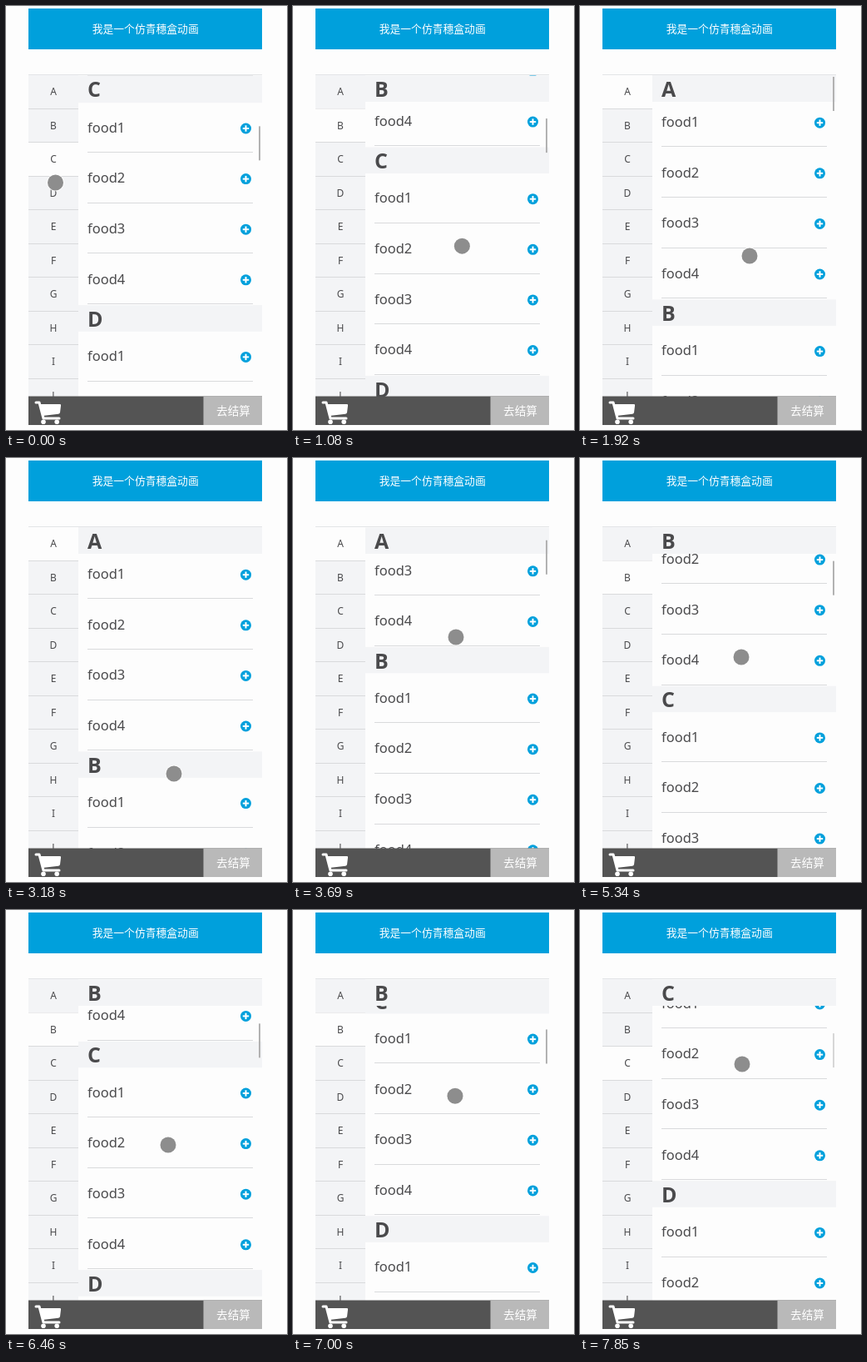
Write an HTML page with a canvas that moves like this. It is 338 by 509 pixels and loops after 8000 ms.

```html
<!DOCTYPE html>
<html lang="zh">
<head>
<meta charset="utf-8">
<style>
  html, body { margin: 0; width: 100%; height: 100%; overflow: hidden; background: #fdfdfd; }
  canvas { display: block; width: 338px; height: 509px; }
</style>
</head>
<body>
<canvas id="stage"></canvas>
<script>
const LOOP = 8000, STEP = 138;
const W = 338, H = 509;
const ROW = 60.6, HEADING = 32, SECTION = 4 * ROW + HEADING, TAB = 40.5;
const LATIN = '"Noto Sans", "Open Sans", sans-serif';
const CJK = '"Noto Sans CJK SC", "Noto Sans CJK", sans-serif';
const PAPER = '#fdfdfd', BLUE = '#00a0dc', PANEL = '#f3f4f6', INK = '#4a4a4c', RULE = '#d9dadc';

// Each glide eases the list to a new offset between two steps.
const GLIDES = [
  { start: -3, end: -2, to: 542 },
  { start: 6, end: 14, to: 0 },
  { start: 23, end: 30, to: 207 },
  { start: 32, end: 45, to: 469 },
  { start: 47, end: 54, to: 576 }
];

// Pointer stops: it eases from one to the next.
const STOPS = [
  { at: 0, x: 59.5, y: 212 },
  { at: 5, x: 200, y: 224 },
  { at: 9, x: 204, y: 300 },
  { at: 14, x: 204, y: 300 },
  { at: 18, x: 37, y: 110 },
  { at: 23, x: 202, y: 379 },
  { at: 27, x: 196, y: 215 },
  { at: 32, x: 195, y: 401 },
  { at: 39, x: 194, y: 239 },
  { at: 47, x: 195, y: 282 },
  { at: 54, x: 195, y: 185 }
];

const canvas = document.getElementById('stage');
const ctx = canvas.getContext('2d');
const ratio = window.devicePixelRatio || 1;
canvas.width = W * ratio;
canvas.height = H * ratio;
ctx.scale(ratio, ratio);

const clamp = v => Math.min(1, Math.max(0, v));
const mix = (a, b, p) => a + (b - a) * p;
const letter = i => String.fromCharCode(65 + i);

function ease(step, start, end) {
  const p = clamp((step - start) / (end - start));
  return p * p * (3 - 2 * p);
}

const scrollAt = step =>
  GLIDES.reduce((offset, g) => mix(offset, g.to, ease(step, g.start, g.end)), 0);

// The bar stays for two steps after a glide, then fades over two more.
function barOpacity(step) {
  const last = GLIDES.findLast(g => g.start < step);
  return clamp((last.end + 4 - step) / 2);
}

const pointerAt = step => STOPS.slice(1).reduce((pos, stop, i) => {
  const p = ease(step, STOPS[i].at, stop.at);
  return { x: mix(pos.x, stop.x, p), y: mix(pos.y, stop.y, p) };
}, STOPS[0]);

function rect(x, y, w, h, color) {
  ctx.fillStyle = color;
  ctx.fillRect(x, y, w, h);
}

function text(str, x, y, font, color, align = 'left') {
  ctx.font = font;
  ctx.fillStyle = color;
  ctx.textAlign = align;
  ctx.fillText(str, x, Math.round(y));
}

function disc(x, y, r, color) {
  ctx.fillStyle = color;
  ctx.beginPath();
  ctx.arc(x, y, r, 0, Math.PI * 2);
  ctx.fill();
}

function heading(i, y) {
  rect(87, y, 221, HEADING - 0.5, PANEL);
  text(letter(i), 98, y + 25.7, `bold 25px ${LATIN}`, INK);
}

function addButton(x, y) {
  disc(x, y, 6.5, BLUE);
  rect(x - 3.7, y - 1, 7.4, 2, '#fff');
  rect(x - 1, y - 3.7, 2, 7.4, '#fff');
}

function drawSections(scroll) {
  for (let i = 0; i < 5; i++) {
    const top = 78 + i * SECTION - scroll;
    for (let k = 0; k < 4; k++) {
      const y = top + 61 + k * ROW;
      text('food' + (k + 1), 98, y + 6, `16.5px ${LATIN}`, INK);
      addButton(288.5, y + 1.2);
      rect(98, Math.round(y + 29.45), 199, 1, RULE);
    }
    heading(i, top);
  }
}

function drawSidebar(active) {
  rect(27, 83, 60, 386, PANEL);
  for (let i = 0; i < 10; i++) {
    const y = 83 + i * TAB;
    if (i === active) rect(27, y, 60, TAB, PAPER);
    text(letter(i), 57, y + 24.4, `12px ${LATIN}`, INK, 'center');
    rect(27, Math.round(y + 39.6), 60, 1, RULE);
  }
}

function drawList(step) {
  const scroll = scrollAt(step);
  const active = Math.floor((scroll + 8) / SECTION);
  ctx.save();
  ctx.beginPath();
  ctx.rect(27, 83, 281, 386);
  ctx.clip();
  drawSections(scroll);
  heading(active, 83.5);
  drawSidebar(active);
  ctx.globalAlpha = barOpacity(step);
  rect(304, 85 + scroll * 0.1095, 2, 41, '#b2b2b2');
  ctx.restore();
  rect(27, 82, 281, 1, '#e3e5e7');
}

function drawCart() {
  ctx.fillStyle = ctx.strokeStyle = '#fff';
  ctx.lineWidth = 3;
  ctx.lineCap = ctx.lineJoin = 'round';
  ctx.stroke(new Path2D('M36 476H40L45 495H64'));
  ctx.fill(new Path2D('M41 478H65Q66.500 478 66 480L65 488Q64.500 489.500 63 489.700L44 492Z'));
  disc(45, 499.2, 2.8, '#fff');
  disc(61.2, 499.2, 2.8, '#fff');
}

function drawBars() {
  rect(27, 3, 281, 49, BLUE);
  text('我是一个仿青穗盒动画', 167.7, 32, `500 12.8px ${CJK}`, '#fff', 'center');
  rect(27, 468.5, 281, 34.5, '#545454');
  rect(237.5, 468.5, 70.5, 34.5, '#b9b9b9');
  text('去结算', 273.5, 491, `500 13.6px ${CJK}`, '#fff', 'center');
  drawCart();
}

function drawPointer({ x, y }) {
  disc(x, y, 10.5, 'rgba(255,255,255,.85)');
  disc(x, y, 9.5, '#8d8d8d');
}

function render(time) {
  const step = Math.floor((time % LOOP + 48) / STEP);
  rect(0, 0, W, H, PAPER);
  drawList(step);
  drawBars();
  drawPointer(pointerAt(step));
}

function tick() {
  render(performance.now());
  requestAnimationFrame(tick);
}
tick();
</script>
</body>
</html>
```
